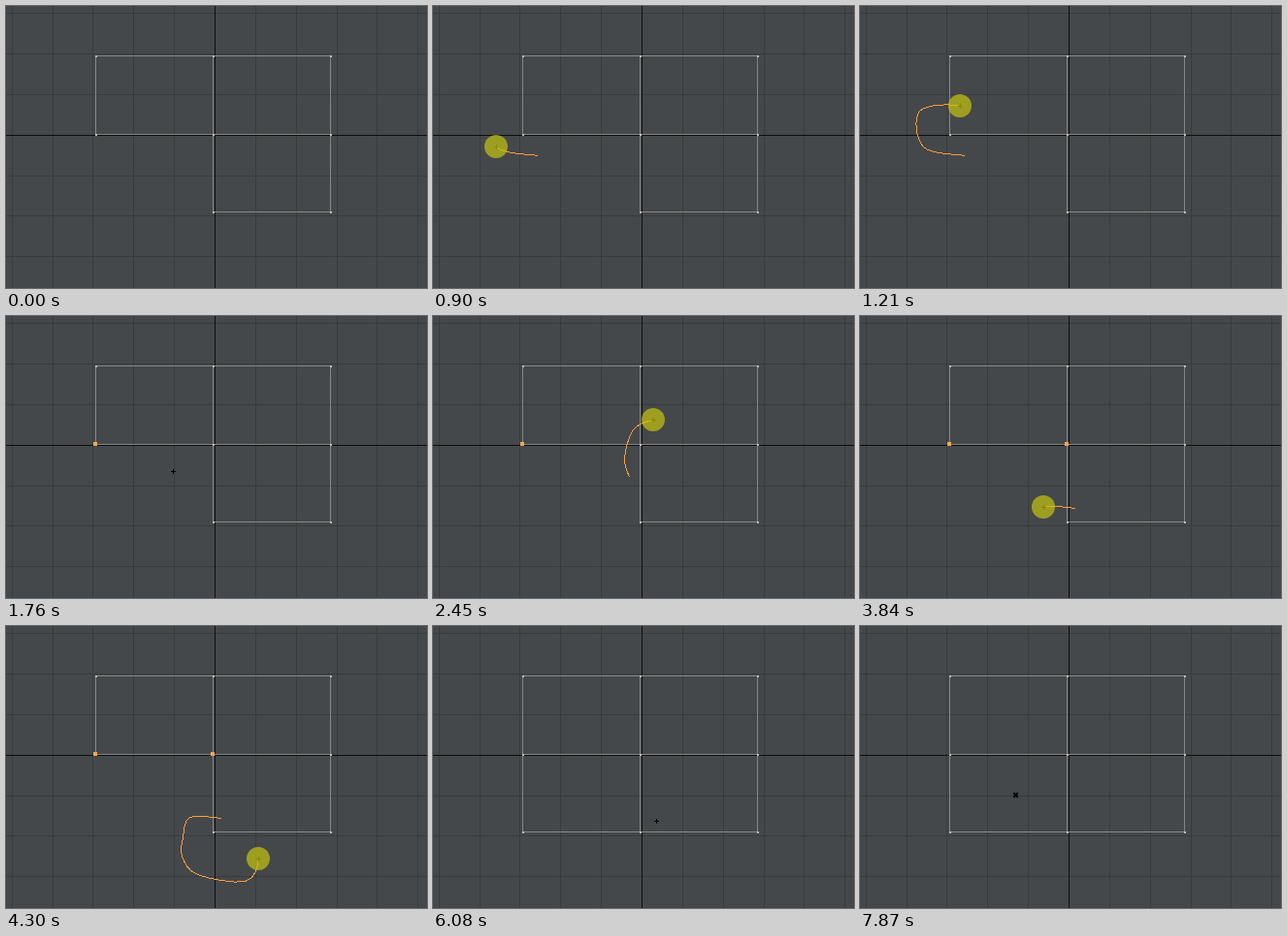
An HTML page for the animation above (8 s loop, 434 by 291 pixels).

```html
<!DOCTYPE html>
<html lang="en">
<head>
<meta charset="utf-8">
<title>Lasso selection and face fill</title>
<style>
  html, body { margin: 0; width: 100%; height: 100%; overflow: hidden; background: #45484a; }
  svg { display: block; width: 434px; height: 291px; }
</style>
</head>
<body>
<svg viewBox="0 0 434 291" xmlns="http://www.w3.org/2000/svg">
  <g shape-rendering="crispEdges">
    <path id="grid" stroke="#393c3d"/>
    <path stroke="#0d0e0e" d="M0 133.5H434M215.5 0V291"/>
    <path id="edges" fill="none" stroke="#858786"/>
    <path id="verts" fill="#bcbcb9"/>
    <path id="picked" fill="#ffa64d"/>
    <path id="trail" fill="none" stroke="#ff9c3c"/>
    <path id="plus" stroke="#000" d="M-2 .5H3M.5 -2V3"/>
  </g>
  <path id="ex" stroke="#000" stroke-width="2" d="M-1.7 -1.7L2.7 2.7M2.7 -1.7L-1.7 2.7"/>
  <circle id="brush" r="12" fill="#c5c40e" fill-opacity=".7"/>
</svg>
<script>
const LOOP = 8000, STEP = 77, FILL_AT = 6080;
const CELL = 41.857;
const COLS = [92, 213, 334], ROWS = [51, 132, 212];
const el = id => document.getElementById(id);

// Each stroke follows a smooth curve through a few key points, one step at a time
const stroke = (start, steps, tool, keys) =>
  ({ start, steps, tool, keys: keys.split(' ').map(p => p.split(',').map(Number)) });

const strokes = [
  stroke(210, 7, 'plus', '326,288 201,207 110,155'),
  stroke(750, 11, 'lasso', '108,154 65,145 61,108 103,103 122,126 108,149'),
  stroke(1600, 3, 'plus', '112,151 172,160'),
  stroke(1910, 2, 'plus', '189,164 202,166'),
  stroke(2220, 9, 'lasso', '202,166 197,146 206,117 227,107 247,112 266,127 246,140 220,146 195,148'),
  stroke(3140, 1, 'plus', '195,148'),
  stroke(3290, 5, 'plus', '199,155 222,198'),
  stroke(3770, 9, 'lasso', '222,198 189,197 182,218 181,237 197,256 246,263 260,240 253,213 230,201'),
  stroke(4610, 1, 'plus', '230,201'),
  stroke(7170, 1, 'ex', '230,201'),
  stroke(7400, 2, 'ex', '238,146 243,101'),
  stroke(7640, 4, 'ex', '232,112 160,174')
];

// Each vertex is selected once the lasso around it is released
const picks = [[1600, 0, 1], [3140, 1, 1], [4610, 1, 2]];

const square = (x, y, size) => `M${x} ${y}h${size}v${size}h${-size}z`;

// Catmull-Rom curve, s from 0 to 1 over all keys
function curve(keys, s) {
  const last = keys.length - 1;
  const u = s * last, i = Math.min(Math.floor(u), Math.max(last - 1, 0)), f = u - i;
  const key = n => keys[Math.max(0, Math.min(last, n))];
  return [0, 1].map(k => {
    const [a, b, c, d] = [-1, 0, 1, 2].map(n => key(i + n)[k]);
    return b + f / 2 * (c - a + f * (2 * a - 5 * b + 4 * c - d + f * (3 * (b - c) + d - a)));
  });
}

function drawGrid() {
  let d = '';
  for (let i = -5; i <= 5; i++) {
    const x = Math.round(215 + i * CELL) + .5;
    const y = Math.round(132.7 + i * CELL) + .5;
    d += `M${x} 0V291M0 ${y}H434`;
  }
  el('grid').setAttribute('d', d);
}

function drawMesh(t) {
  const full = t >= FILL_AT;
  const [left, mid, right] = COLS, [top, centre, bottom] = ROWS;
  let lines = '', dots = '';
  for (const y of ROWS)
    lines += `M${full || y < bottom ? left : mid} ${y + .5}H${right + 1}`;
  for (const x of COLS) {
    lines += `M${x + .5} ${top}V${(full || x > left ? bottom : centre) + 1}`;
    for (const y of ROWS)
      if (full || x > left || y < bottom) dots += square(x - .5, y - .5, 2);
  }
  el('edges').setAttribute('d', lines);
  el('verts').setAttribute('d', dots);
  el('picked').setAttribute('d', full ? '' : picks.filter(([at]) => t >= at)
    .map(([, col, row]) => square(COLS[col] - 2, ROWS[row] - 2, 4)).join(''));
}

function place(id, shown, x, y) {
  el(id).setAttribute('display', shown ? 'inline' : 'none');
  el(id).setAttribute('transform', `translate(${x} ${y})`);
}

function render(t) {
  drawMesh(t);
  const now = strokes.filter(s => t >= s.start).pop() || { start: 0, steps: 1, keys: [[0, 0]] };
  const { start, steps, tool, keys } = now;
  const step = Math.min(steps - 1, Math.floor((t - start) / STEP + .1));
  const at = n => curve(keys, n / Math.max(1, steps - 1));
  const [x, y] = at(step).map(Math.round);
  const lasso = tool === 'lasso';
  place('plus', lasso || tool === 'plus', x, y);
  place('ex', tool === 'ex', x, y);
  place('brush', lasso, x, y);
  const trail = [];
  if (lasso)
    for (let n = 0; n <= step; n += .25) trail.push(at(n).map(v => v + .5).join(' '));
  el('trail').setAttribute('d', trail.length > 1 ? 'M' + trail.join('L') : '');
}

drawGrid();
const begin = performance.now();
function tick() {
  render((performance.now() - begin) % LOOP);
  requestAnimationFrame(tick);
}
tick();
</script>
</body>
</html>
```
